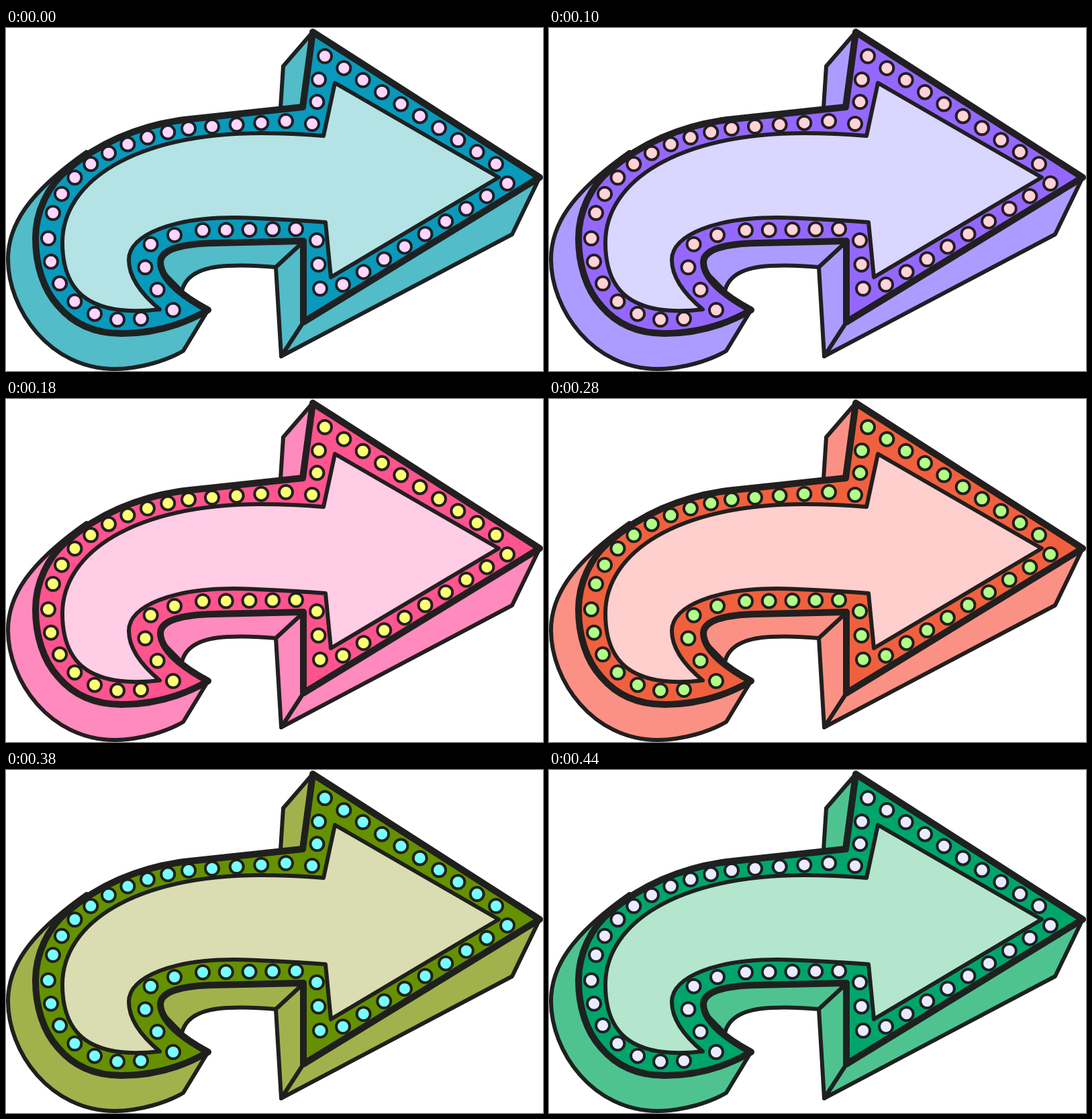
An HTML page for the animation above (480 ms loop, 800 by 512 pixels).

```html
<!DOCTYPE html>
<html lang="en">
<head>
<meta charset="utf-8">
<title>Marquee arrow</title>
<style>
  html, body { margin: 0; width: 100%; height: 100%; overflow: hidden; background: #fff; }
  svg { display: block; width: 800px; height: 512px; }
  svg * { stroke: #231f20; stroke-linejoin: round; stroke-linecap: round; }
  .side { fill: #ff8abd; stroke-width: 6; }
  .rim { fill: #ff548e; stroke-width: 10; }
  .face { fill: #ffcde6; stroke-width: 6; }
  circle { fill: #ffff74; stroke-width: 4; }
</style>
</head>
<body>
<svg id="arrow" viewBox="0 0 800 512">
  <g class="side">
    <path d="M457 6L413 57L409 119H442Z"/>
    <path d="M120 185C32 247 3 295 3 345C3 420 65 509 162 509C200 509 240 496 264 482L301 421L172 440Z"/>
    <path d="M443 319L402 357C370 354 350 354 330 355C290 357 267 370 262 393L220 350L260 322Z"/>
    <path d="M795 223L754 308L410 490L443 439Z"/>
    <path d="M443 319L402 357L410 490L443 439Z"/>
  </g>
  <path class="rim" d="M457 6L795 223L443 439V318L310 321C258 322 230 332 230 350C231 375 262 400 301 421
    C260 445 215 456 172 456C130 456 100 441 78 415C55 390 44 352 44 314C44 275 62 236 91 212
    C135 174 195 146 265 137L442 118Z"/>
  <path class="face" d="M490 82L734 223L484 372L476 290C420 286 390 284 340 283C250 283 183 308 183 346
    C183 375 205 400 229 420C195 424 160 423 135 412C100 398 84 365 84 320C84 230 190 157 380 157
    C420 157 450 159 473 161Z"/>
</svg>
<script>
const SVG = 'http://www.w3.org/2000/svg';
const LOOP = 480;
const STARTS = [0, 40, 100, 140, 180, 280, 320, 380, 400, 440];
const HUE_STEP = 360 / STARTS.length;
const FIRST_HUE = 6 * HUE_STEP;
const arrow = document.getElementById('arrow');

function create(tag, attributes) {
  const node = document.createElementNS(SVG, tag);
  for (const name in attributes) node.setAttribute(name, attributes[name]);
  return node;
}

// Places evenly spaced bulbs along a path, both ends included.
function addBulbs(count, d) {
  const track = create('path', { d });
  const gap = track.getTotalLength() / (count - 1);
  for (let i = 0; i < count; i++) {
    const { x, y } = track.getPointAtLength(i * gap);
    arrow.append(create('circle', { cx: x, cy: y, r: 10 }));
  }
}

addBulbs(10, 'M475 42L730 203');
addBulbs(9, 'M747 232L502 383');
addBulbs(3, 'M468 389L463 317');
addBulbs(5, 'M432 300L293 302');
addBulbs(5, 'M251 309C190 322 190 350 249 421');
addBulbs(7, 'M201 434C130 446 63 400 63 314');
addBulbs(9, 'M70 276C90 210 170 165 272 150');
addBulbs(4, 'M307 147L417 139');
addBulbs(3, 'M456 143Q466 110 466 77');

function tick() {
  const time = performance.now() % LOOP;
  const step = STARTS.filter(start => start <= time).length - 1;
  arrow.style.filter = `hue-rotate(${FIRST_HUE + step * HUE_STEP}deg)`;
  requestAnimationFrame(tick);
}
tick();
</script>
</body>
</html>
```
